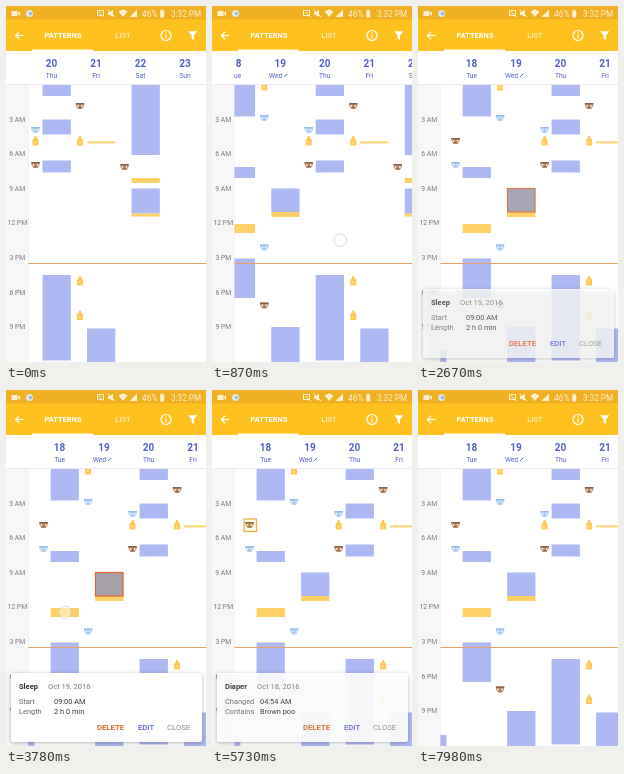
These frames come from a looping animation (200 by 356 pixels, 8.04 s). An HTML page with a canvas:

```html
<!DOCTYPE html>
<html lang="en">
<head>
<meta charset="utf-8">
<title>Baby patterns</title>
<style>
html, body { margin: 0; width: 100%; height: 100%; overflow: hidden; background: #fff; }
canvas { display: block; width: 200px; height: 356px; }
</style>
</head>
<body>
<canvas id="stage"></canvas>
<script>
const W = 200, H = 356, LOOP = 8040;
const AXIS = 22, BAR = 45, TOP = 79, PITCH = 44.5;
const AMBER = '#ffc11f', SLEEP = '#aeb9f3', FEED = '#fdd166', INDIGO = '#5160c8', ORANGE = '#e2672f';
const ICON = '#fff1cf';
const canvas = document.getElementById('stage');
const g = canvas.getContext('2d');
const ratio = Math.max(1, window.devicePixelRatio || 1);
canvas.width = W * ratio;
canvas.height = H * ratio;

const clamp = v => Math.max(0, Math.min(1, v));
const ramp = (t, a, b) => clamp((t - a) / (b - a));

// Bars: kind, top, bottom. Marks: kind, y.
const days = {
  17: { name: 'Mon', bars: [['s', 345, 356]], marks: [] },
  18: { name: 'Tue', bars: [['s', 79, 110.5], ['s', 161, 172], ['f', 218, 227], ['s', 252.5, 292]],
        marks: [['poo', 135], ['pee', 159]] },
  19: { name: 'Wed', bars: [['s', 182.5, 206], ['f', 206, 211], ['s', 321, 356]],
        marks: [['bottle', 80], ['pee', 112], ['pee', 241.5], ['poo', 299.5]] },
  20: { name: 'Thu', bars: [['s', 79, 90], ['s', 113.5, 128.5], ['s', 154.5, 166.5], ['s', 269, 354.5]],
        marks: [['pee', 124], ['bottle', 135], ['poo', 159]] },
  21: { name: 'Fri', bars: [['f', 135.5, 137.3], ['s', 322.5, 356]],
        marks: [['poo', 100], ['bottle', 135], ['bottle', 275], ['bottle', 309.5]] },
  22: { name: 'Sat', bars: [['s', 79, 149], ['f', 172, 177], ['s', 182.5, 207.5], ['f', 207.5, 210.5]],
        marks: [['poo', 161]] },
  23: { name: 'Sun', bars: [], marks: [] }
};

const cards = [
  { from: 2550, to: 3840, fadeIn: 150, title: 'Sleep', date: 'Oct 19, 2016', dateX: 42,
    rows: [['Start', '09:00 AM'], ['Length', '2 h 0 min']], box: [89.5, 182.5, 27.5, 23.5], fill: '#a6a1a8', edge: ORANGE },
  { from: 3840, to: 4950, title: 'Breast', date: 'Oct 18, 2016', dateX: 44,
    rows: [['Start', '12:05 PM'], ['Length', '0 h 44 min']], box: [45, 218, 28, 9], fill: '#b5a78c', edge: ORANGE },
  { from: 4950, to: 5690, fadeOut: 150, title: 'Diaper', date: 'Oct 18, 2016', dateX: 45,
    rows: [['Changed', '04:54 AM'], ['Contains', 'Brown poo']], box: [32, 129, 12.5, 12.5], fill: 'rgba(255,193,31,.12)', edge: '#f0a53c' },
  { from: 6150, to: 7540, fadeIn: 150, fadeOut: 150, summary: true }
];

const taps = [
  [2370, 2590, 104, 194], [3700, 3920, 59, 222.5],
  [4810, 5030, 38, 135], [6010, 6230, 54, 63], [7400, 7620, 173, 337]
];

function rect(x, y, w, h, color) {
  g.fillStyle = color;
  g.fillRect(x, y, w, h);
}

function text(str, x, y, size, color, weight = 400, align = 'left') {
  g.font = `${weight} ${size}px Roboto, Arial, sans-serif`;
  g.textAlign = align;
  g.textBaseline = 'alphabetic';
  g.fillStyle = color;
  g.fillText(str, x, y);
}

function poly(points, color, line) {
  g.beginPath();
  points.forEach(([x, y], i) => i ? g.lineTo(x, y) : g.moveTo(x, y));
  if (line) {
    g.lineWidth = line;
    g.strokeStyle = color;
    g.stroke();
  } else {
    g.fillStyle = color;
    g.fill();
  }
}

function disc(x, y, r, color, line) {
  g.beginPath();
  g.arc(x, y, r, 0, Math.PI * 2);
  g.fillStyle = g.strokeStyle = color;
  g.lineWidth = line || 0;
  line ? g.stroke() : g.fill();
}

function diaper(x, y, color, dark) {
  poly([[x - 4.2, y - 3], [x + 4.2, y - 3], [x + 4, y], [x + 2, y + 3], [x - 2, y + 3], [x - 4, y]], color);
  rect(x - 4.2, y - 3, 8.4, 1.4, dark);
  disc(x - 2.1, y, .9, '#f4ece6');
  disc(x + 2.1, y, .9, '#f4ece6');
  rect(x - .8, y + .6, 1.6, 1.4, dark);
}

function bottle(x, y) {
  rect(x - 1, y - 4.8, 2, 2, '#f5c04a');
  poly([[x - 1.2, y - 3.3], [x + 1.2, y - 3.3], [x + 3, y - 1], [x + 3, y + 4.4], [x - 3, y + 4.4], [x - 3, y - 1]], '#fdcb52');
  rect(x - 1.6, y + .2, 2.2, 2.2, '#fedb86');
}

function mark(kind, x, y) {
  if (kind === 'bottle') bottle(x, y);
  else if (kind === 'poo') diaper(x, y, '#b58a68', '#8a6045');
  else diaper(x, y, '#b3d4f7', '#93bdec');
}

function statusBar() {
  rect(0, 0, W, 13.3, '#efb024');
  rect(5.5, 5, 6, 5, ICON);
  poly([[11.5, 7.5], [14, 5], [14, 10]], ICON);
  disc(23.5, 7.5, 3.5, '#dceaf0');
  disc(24.5, 7.5, 1.5, '#8fb3c0');
  g.strokeStyle = ICON;
  g.lineWidth = 1;
  g.strokeRect(91.5, 4.5, 6, 5);
  poly([[93, 6], [98.5, 11]], ICON, 1);
  poly([[102, 6], [104, 6], [107, 3.5], [107, 11], [104, 9], [102, 9]], ICON);
  poly([[101.5, 3.5], [109, 11]], ICON, 1);
  poly([[112.5, 5.5], [117, 3.3], [121.5, 5.5], [117, 11]], ICON);
  poly([[123.5, 11], [131, 11], [131, 3.5]], ICON);
  text('46%', 136, 10.7, 8.4, ICON);
  rect(154.2, 4.5, 4, 7, ICON);
  rect(155.3, 3.4, 1.8, 1.2, ICON);
  text('3:32 PM', 165, 10.7, 8.2, ICON);
}

function appBar() {
  rect(0, 0, W, BAR, AMBER);
  statusBar();
  poly([[17.5, 29.5], [9.5, 29.5]], '#fff', 1.2);
  poly([[13.3, 25.7], [9.5, 29.5], [13.3, 33.3]], '#fff', 1.2);
  text('PATTERNS', 57, 32.4, 7.5, '#fff', 700, 'center');
  text('LIST', 117, 32.4, 7.5, 'rgba(255,255,255,.7)', 500, 'center');
  rect(26, BAR - 1.5, 61, 1.5, '#fff');
  disc(160, 29.5, 5, '#fff', 1.2);
  rect(159.4, 28.8, 1.2, 3.6, '#fff');
  rect(159.4, 26.6, 1.2, 1.2, '#fff');
  poly([[182.2, 25.2], [191.4, 25.2], [188, 29.6], [188, 34], [185.6, 32.4], [185.6, 29.6]], '#fff');
}

function clipTo(x, y, w, h, draw) {
  g.save();
  g.beginPath();
  g.rect(x, y, w, h);
  g.clip();
  draw();
  g.restore();
}

function grid(origin) {
  const each = fn => {
    for (const d in days) fn(days[d], origin + (d - 20) * PITCH, d);
  };
  clipTo(AXIS, TOP, W - AXIS, H - TOP, () => {
    each((day, x) => {
      for (const [kind, a, b] of day.bars) rect(x - 9, a, 28.3, b - a, kind === 's' ? SLEEP : FEED);
      for (const [kind, y] of day.marks) mark(kind, x - 16, y);
    });
    rect(AXIS, 257, W - AXIS, 1, '#e3a367');
  });
  clipTo(AXIS, BAR, W - AXIS, TOP - BAR, () => each((day, x, d) => {
    const pencil = day.name === 'Wed';
    text(d, x, 61.3, 10, INDIGO, 700, 'center');
    text(day.name, x - (pencil ? 4.6 : 0), 71.6, 6.7, INDIGO, 400, 'center');
    if (pencil) poly([[x + 4, 71], [x + 7.2, 67.8]], INDIGO, 1);
  }));
}

function axis() {
  rect(0, TOP, AXIS, H - TOP, '#f7f7f7');
  ['3 AM', '6 AM', '9 AM', '12 PM', '3 PM', '6 PM', '9 PM'].forEach((s, i) =>
    text(s, 11.3, 115.6 + i * 34.6, 6.8, '#777', 400, 'center'));
  rect(0, TOP - .6, W, .6, '#dedede');
  rect(AXIS, TOP, .5, H - TOP, '#e6e6e6');
}

// Greys every column except the one being summed up.
function shade(alpha) {
  const color = `rgba(0,0,0,${.075 * alpha})`;
  rect(AXIS, BAR, 31.5 - AXIS, H - BAR, color);
  rect(76, BAR, W - 76, H - BAR, color);
}

function panel(y) {
  g.save();
  g.shadowColor = 'rgba(0,0,0,.3)';
  g.shadowBlur = 4 * ratio;
  g.shadowOffsetY = ratio;
  g.beginPath();
  g.roundRect(5, y, 191, 352 - y, 2);
  g.fillStyle = '#fff';
  g.fill();
  g.restore();
}

function summary() {
  panel(276.5);
  text('Oct 18, 2016', 13, 292.8, 7.4, '#333', 700);
  const rows = [
    ['Breast', '44 min', 'Sleep', '7 h 8 min'],
    ['Bottle', '0.0 oz', 'Poo', ''],
    ['Solid', '0 time(s)', 'Pumping', '0.00 oz']
  ];
  rows.forEach((row, r) => row.forEach((s, c) =>
    text(s, [13, 48, 100, 135][c], 303.3 + r * 10.3, 7.3, c % 2 ? '#333' : '#666')));
  text('1', 121, 313.6, 7.3, '#333');
  text('Pee', 143, 313.6, 7.3, '#666');
  text('1', 164, 313.6, 7.3, '#333');
}

function details(card) {
  rect(...card.box, card.fill);
  g.strokeStyle = card.edge;
  g.lineWidth = 1.2;
  g.strokeRect(...card.box);
  panel(283);
  text(card.title, 13, 299, 7.5, '#333', 700);
  text(card.date, card.dateX, 299, 7.6, '#777');
  card.rows.forEach(([label, value], i) => {
    text(label, 13, 313.8 + i * 10.4, 7.4, '#666');
    text(value, 48, 313.8 + i * 10.4, 7.4, '#333');
  });
  text('DELETE', 91, 340.2, 7.7, ORANGE, 700);
  text('EDIT', 132, 340.2, 7.7, INDIGO, 500);
}

function opacity(card, t) {
  const out = card.fadeOut || 0;
  if (t < card.from || t >= card.to + out) return 0;
  const gone = out ? ramp(t, card.to, card.to + out) : 0;
  const seen = card.fadeIn ? ramp(t, card.from, card.from + card.fadeIn) : 1;
  return seen * (1 - gone * gone);
}

function showCard(card, alpha) {
  g.save();
  g.globalAlpha = alpha;
  card.summary ? summary() : details(card);
  text('CLOSE', 161, 340.2, 7.7, '#888');
  g.restore();
}

function touch(x, y, alpha) {
  g.save();
  g.globalAlpha = alpha;
  disc(x, y, 6.3, 'rgba(255,255,255,.45)');
  disc(x, y, 6.3, 'rgba(190,195,215,.6)', 1);
  g.restore();
}

const pulse = (t, a, b) => Math.min(ramp(t, a, a + 60), 1 - ramp(t, b - 60, b));

function render(t) {
  g.setTransform(ratio, 0, 0, ratio, 0, 0);
  rect(0, 0, W, H, '#fff');
  const left = 1 - ramp(t, 120, 1803);
  const origin = 142.6 - 97.1 * left * left;
  const open = cards.find(card => opacity(card, t) > 0);
  const alpha = open ? opacity(open, t) : 0;
  if (open && open.summary) shade(alpha);
  grid(origin);
  axis();
  appBar();
  if (open) showCard(open, alpha);
  if (t > 60 && t < 1590) touch(origin + 14.2 + 2.5 * left, 237 - 5 * left, pulse(t, 60, 1590));
  for (const [a, b, x, y] of taps) if (t > a && t < b) touch(x, y, pulse(t, a, b));
}

const start = performance.now();
function tick() {
  const t = (performance.now() - start) % LOOP;
  render(Math.min(Math.floor(t / 30) * 30, 7980));
  requestAnimationFrame(tick);
}
tick();
</script>
</body>
</html>
```
